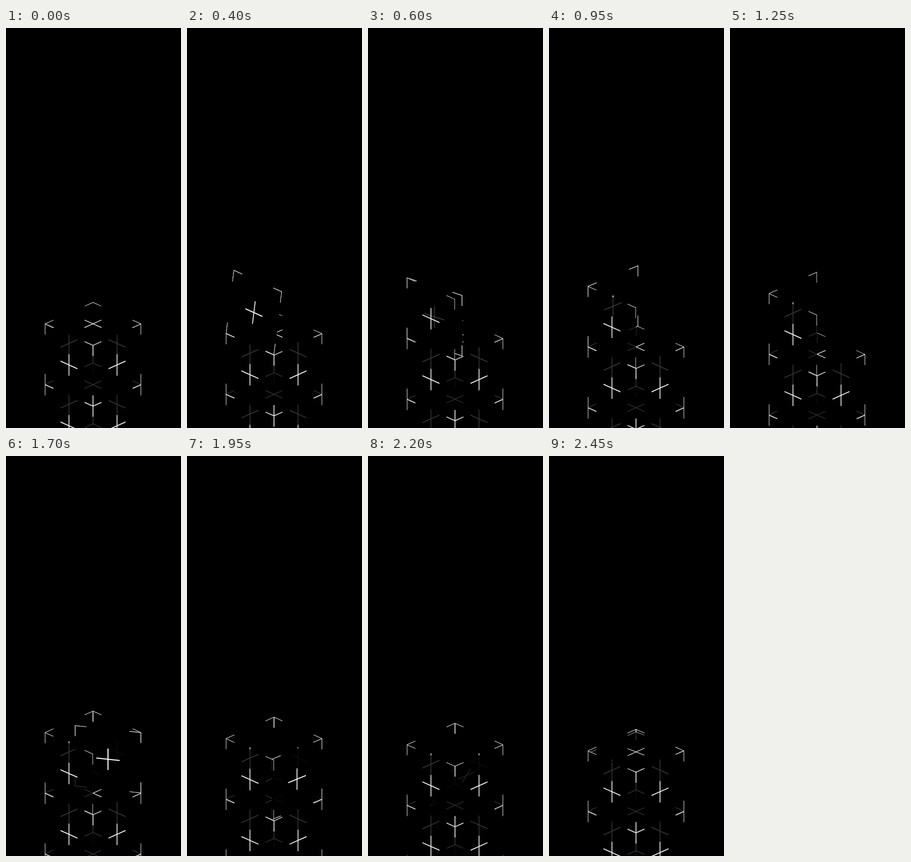
An HTML page for the animation above (2.5 s loop, 350 by 800 pixels).

```html
<!DOCTYPE html>
<html lang="en">
<head>
<meta charset="utf-8">
<title>Endless box tower</title>
<style>
  html, body { margin: 0; width: 100%; height: 100%; overflow: hidden; background: #000; }
  svg { display: block; width: 350px; height: 800px; }
</style>
</head>
<body>
<svg id="stage" viewBox="0 0 350 800">
  <defs>
    <g id="face">
      <path id="pane" fill="#000" fill-opacity=".79"/>
      <path id="marks" fill="#fff"/>
    </g>
  </defs>
  <g id="tower"></g>
</svg>
<script>
const LOOP = 2500, STEP = 50, FOLD = 500;
const SIDE = 136, ARM = 24, HALF = 1.08;   // panel size, mark length, half line width
const CX = 174, CY = 591.6;
const BOXES = 5;                           // one folding box on top of finished ones
const ORDER = [1, 2, 4, 3, 0];             // panels from back to front

const KX = Math.SQRT1_2, KY = Math.SQRT1_2 * Math.sqrt(0.2), KZ = Math.sqrt(0.8);
const RISE = SIDE * KZ;
const $ = id => document.getElementById(id);

// Directions on screen, per unit of panel
const SE = [KX, KY], NE = [KX, -KY], NW = [-KX, -KY], SW = [-KX, KY];
const UP = [0, -KZ], DOWN = [0, KZ];

// Corners of the box floor
const LEFT = [-SIDE * KX, 0], RIGHT = [SIDE * KX, 0], BACK = [0, -SIDE * KY];
const RIGHT_TOP = [RIGHT[0], -RISE];

const rect = (x, y, w, h) => `M${x} ${y}h${w}v${h}h${-w}z`;

function markPath() {
  const m = SIDE / 2;
  let d = rect(m - ARM, m - HALF, 2 * ARM, 2 * HALF) + rect(m - HALF, m - ARM, 2 * HALF, 2 * ARM);
  for (const x of [0, SIDE]) for (const y of [0, SIDE]) {
    const sx = x ? -1 : 1, sy = y ? -1 : 1;
    d += rect(x, y, sx * ARM, sy * HALF) + rect(x, y, sx * HALF, sy * ARM);
  }
  return d;
}

const ease = p => p * p * (3 - 2 * p);

// Quarter turn from direction a to direction b
function turn(a, b, p) {
  const c = Math.cos(p * Math.PI / 2), s = Math.sin(p * Math.PI / 2);
  return [a[0] * c + b[0] * s, a[1] * c + b[1] * s];
}

// Each pose gives hinge, first axis and second axis of a panel
const POSES = [
  p => [LEFT, SE, turn(NE, UP, p)],
  p => [LEFT, turn(SE, NE, p), UP],
  p => [BACK, turn(SW, SE, p), UP],
  p => [RIGHT, turn(NW, SW, p), UP],
  p => [RIGHT_TOP, SW, turn(DOWN, NW, p)]
];

function place(el, [o, u, v], y) {
  const m = [...u, ...v, CX + o[0], y + o[1]].map(n => n.toFixed(4));
  el.setAttribute("transform", `matrix(${m})`);
}

$("pane").setAttribute("d", rect(0, 0, SIDE, SIDE));
$("marks").setAttribute("d", markPath());

const boxes = [];
for (let i = BOXES - 1; i >= 0; i--) {
  boxes[i] = ORDER.map(panel => {
    const el = document.createElementNS("http://www.w3.org/2000/svg", "use");
    el.setAttribute("href", "#face");
    $("tower").append(el);
    return { el, panel };
  });
}

function draw(t) {
  const phase = Math.floor(t / FOLD);
  const p = ease(t / FOLD - phase);
  boxes.forEach((box, i) => {
    const y = CY + RISE * (i + t / LOOP);
    for (const { el, panel } of box) {
      // Panels not yet unfolded travel with the one that is turning
      const moving = i === 0 && panel >= phase;
      place(el, moving ? POSES[phase](p) : POSES[panel](1), y);
    }
  });
}

function tick(now) {
  draw(Math.floor((now % LOOP) / STEP) * STEP);
  requestAnimationFrame(tick);
}
draw(0);
requestAnimationFrame(tick);
</script>
</body>
</html>
```
